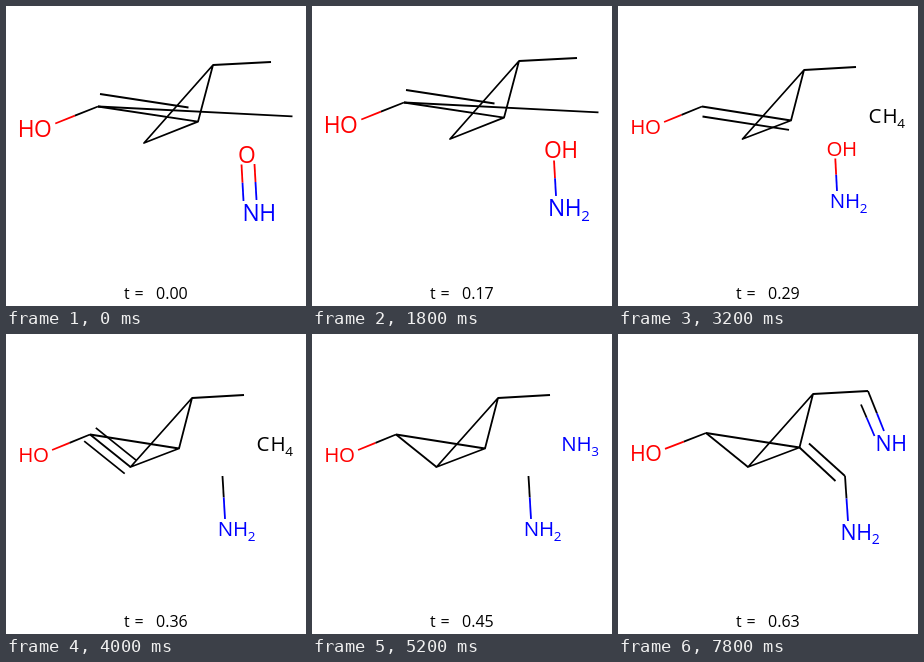
An HTML page with a canvas that plays this animation: 300x300 px, repeating every 8000 ms.

```html
<!DOCTYPE html>
<html lang="en">
<head>
<meta charset="utf-8">
<style>
  html, body { margin: 0; width: 100%; height: 100%; overflow: hidden; background: #fff; }
  canvas { display: block; width: 300px; height: 300px; }
</style>
</head>
<body>
<canvas id="stage" width="300" height="300"></canvas>
<script>
const ctx = document.getElementById("stage").getContext("2d");
const LOOP = 8000, STEP = 200;
const FONT = '"Open Sans", "Noto Sans", sans-serif';
const BLACK = "#000", RED = "#f00", BLUE = "#00f";

function line(color, ...points) {
  ctx.strokeStyle = color;
  ctx.beginPath();
  points.forEach(([x, y]) => ctx.lineTo(x, y));
  ctx.stroke();
}

// Bond whose two halves take the colours of their atoms.
function bond(a, b, startColor = BLACK, endColor = BLACK, split = 0.5) {
  const mid = [a[0] + (b[0] - a[0]) * split, a[1] + (b[1] - a[1]) * split];
  line(startColor, a, mid);
  line(endColor, mid, b);
}

// The element sits on (x, y); hydrogens follow on the given side.
function label(element, x, y, size, color, { hydrogens = "H", side = 1 } = {}) {
  const glyph = (text, gx, gy, fontSize) => {
    ctx.font = `${fontSize}px ${FONT}`;
    ctx.fillText(text, gx, gy + fontSize * 0.357);
  };
  ctx.fillStyle = color;
  ctx.textAlign = "center";
  glyph(element, x, y, size);
  if (!hydrogens) return;
  const hx = x + side * size * 0.735;
  glyph("H", hx, y, size);
  if (hydrogens[1]) glyph(hydrogens[1], hx + size * 0.54, y + size * 0.33, size * 0.66);
}

// Four-carbon skeleton with its methyl arm and hydroxyl group.
function skeleton({ a, b, c, d, e, o, size }) {
  line(BLACK, a, c, b, d, c);
  line(BLACK, d, e);
  bond([o[0] + size * 0.54, o[1] - size * 0.22], a, RED, BLACK, 0.46);
  label("O", ...o, size, RED, { side: -1 });
}

const wide = { a: [92, 100.5], b: [138, 137], c: [192, 115.7], d: [207, 59], e: [265, 56], o: [37, 122.5], size: 22.8 };
const compact = { a: [84, 100.5], b: [124.5, 133], c: [173, 114.5], d: [186, 64], e: [238, 61], o: [35, 120.5], size: 20.5 };
const joined = { a: [88, 99], b: [130, 133], c: [181.5, 113.5], d: [195, 60], e: [250, 57], o: [35.5, 119.5], size: 21.3 };

function wideBase() {
  skeleton(wide);
  line(BLACK, [94, 88], [182.5, 101.5]);
  line(BLACK, wide.a, [286.5, 110.3]);
}

function wideOxime() {
  wideBase();
  bond([235.5, 158.5], [237.5, 195], RED, BLUE);
  bond([248.5, 158], [250.5, 194], RED, BLUE);
  label("O", 241, 148.5, wide.size, RED, { hydrogens: "" });
  label("N", 245, 206.5, wide.size, BLUE);
}

function wideAmine() {
  ctx.save();
  ctx.translate(0, -4);
  wideBase();
  bond([242, 158.5], [244, 194], RED, BLUE);
  label("O", 241, 148, wide.size, RED);
  label("N", 244.5, 206, wide.size, BLUE, { hydrogens: "H2" });
  ctx.restore();
}

function compactBase(element, color, hydrogens) {
  skeleton(compact);
  label(element, 257, 110, compact.size, color, { hydrogens });
  label("N", 219.5, 195, compact.size, BLUE, { hydrogens: "H2" });
}

function compactHydroxyl() {
  compactBase("C", BLACK, "H4");
  line(BLACK, [84.5, 110.5], [171, 123.8]);
  bond([217.3, 152.5], [219, 185], RED, BLUE);
  label("O", 216.5, 143, compact.size, RED);
}

const methylAmine = () => bond([216.5, 142], [219, 185], BLACK, BLUE);

function compactTriple() {
  compactBase("C", BLACK, "H4");
  methylAmine();
  const { a, b } = compact;
  line(BLACK, a, b);
  for (const s of [-1, 1])
    line(BLACK, [a[0] - 5.8 * s, a[1] + 6.6 * s], [b[0] - 5.8 * s, b[1] + 6.6 * s]);
}

function compactAmmonia() {
  compactBase("N", BLUE, "H3");
  methylAmine();
  line(BLACK, compact.a, compact.b);
}

function slantedDouble([x, y], [px, py]) {
  line(BLACK, [x, y], [px - 9.5, py + 5]);
  line(BLACK, [x + 9.5, y - 4], [px, py]);
}

function compactEnamine() {
  compactAmmonia();
  slantedDouble(compact.c, [216.5, 142]);
}

function joinedImine() {
  const { a, b, c, e, size } = joined;
  skeleton(joined);
  line(BLACK, a, b);
  slantedDouble(c, [227, 142]);
  bond([227, 142], [230, 187], BLACK, BLUE);
  bond(e, [266, 97]  , BLACK, BLUE, 0.56);
  bond([243, 70.5], [256.5, 102], BLACK, BLUE, 0.42);
  label("N", 265.5, 109.5, size, BLUE);
  label("N", 230.5, 198, size, BLUE, { hydrogens: "H2" });
}

const scenes = [
  [0, wideOxime], [800, wideAmine], [2200, compactHydroxyl], [3600, compactTriple],
  [4600, compactAmmonia], [5800, compactEnamine], [7400, joinedImine]
];

function caption(value) {
  ctx.fillStyle = BLACK;
  ctx.textAlign = "left";
  ctx.font = `16px ${FONT}`;
  ctx.fillText("t", 118, 292.5);
  ctx.fillText("=", 128.5, 292.5);
  ctx.fillText(value.toFixed(2), 150, 292.5);
}

function draw(now) {
  const time = now % LOOP;
  const progress = Math.floor(time / STEP) / 100;
  ctx.fillStyle = "#fff";
  ctx.fillRect(0, 0, 300, 300);
  ctx.lineWidth = 1.8;
  ctx.lineJoin = "round";
  scenes.findLast(([start]) => time >= start)[1]();
  caption(1 - (1 - progress) ** 2);
  requestAnimationFrame(() => draw(performance.now() - origin));
}

const origin = performance.now();
draw(0);
</script>
</body>
</html>
```
